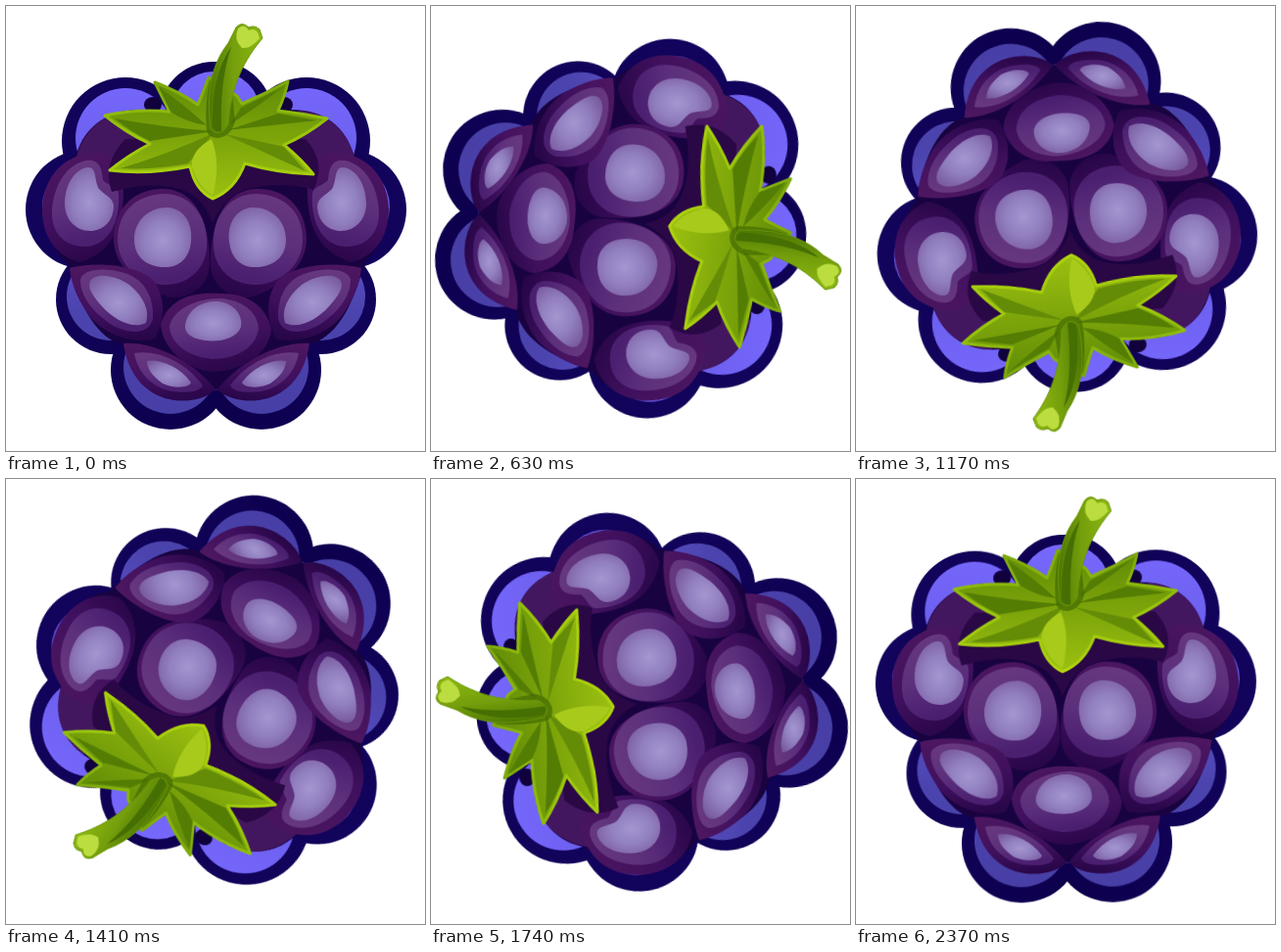
Animation of 428 by 455 pixels, one loop 2400 ms. Source, as an HTML page:

```html
<!DOCTYPE html>
<html lang="en">
<head>
<meta charset="utf-8">
<title>Spinning blackberry</title>
<style>
  html, body { margin: 0; width: 100%; height: 100%; overflow: hidden; background: #fff; }
  svg { display: block; width: 100%; height: 100%; }
  #berry { transform-origin: 214.5px 226px; }
</style>
</head>
<body>
<svg viewBox="0 0 428 455">
  <defs>
    <linearGradient id="navy" gradientUnits="userSpaceOnUse" x1="20" y1="200" x2="408" y2="300">
      <stop stop-color="#12045c"/><stop offset=".5" stop-color="#0e0050"/><stop offset="1" stop-color="#09003c"/>
    </linearGradient>
    <linearGradient id="rim" gradientUnits="userSpaceOnUse" x1="214" y1="70" x2="214" y2="414">
      <stop stop-color="#7668fc"/><stop offset=".3" stop-color="#6a5cea"/><stop offset=".7" stop-color="#4c44ae"/><stop offset="1" stop-color="#473fa6"/>
    </linearGradient>
    <linearGradient id="skin" x1=".3" x2=".6" y2="1">
      <stop stop-color="#4c1660"/><stop offset=".55" stop-color="#40105e"/><stop offset="1" stop-color="#290649"/>
    </linearGradient>
    <linearGradient id="glow" x2=".2" y2="1">
      <stop stop-color="#68397f"/><stop offset=".6" stop-color="#5c2f7c"/><stop offset="1" stop-color="#4b1f70"/>
    </linearGradient>
    <radialGradient id="core" cx=".5" cy=".55" r=".65">
      <stop stop-color="#a496d0"/><stop offset=".5" stop-color="#917fbf"/><stop offset="1" stop-color="#785a9f"/>
    </radialGradient>
    <linearGradient id="leaf" x2="0" y2="1">
      <stop stop-color="#5f8a06"/><stop offset=".5" stop-color="#7da50a"/><stop offset="1" stop-color="#9cc010"/>
    </linearGradient>
    <linearGradient id="edge" x2="0" y2="1">
      <stop stop-color="#7aa60c"/><stop offset=".5" stop-color="#9cc80c"/><stop offset="1" stop-color="#b0d40e"/>
    </linearGradient>
    <linearGradient id="stem" x2="1">
      <stop stop-color="#4d7803"/><stop offset=".45" stop-color="#759f0b"/><stop offset="1" stop-color="#8cb812"/>
    </linearGradient>
  </defs>
  <g id="berry">
    <g id="outer" fill="url(#navy)"></g>
    <g id="inner" fill="url(#rim)"></g>
    <g fill="#10003c">
      <ellipse cx="150" cy="101" rx="9" ry="8"/>
      <ellipse cx="284" cy="101" rx="9" ry="8"/>
    </g>
    <path fill="#180340" d="M72 152C80 124 102 106 140 106H290C326 106 347 124 355 152C400 180 400 232 366 262C354 310 336 340 309 346C300 375 262 402 214 392C166 402 128 375 119 346C94 340 76 310 64 264C30 232 30 180 72 152Z"/>
    <path fill="#43175f" d="M72 154C80 126 102 107 128 107L160 150L108 170ZM356 154C348 126 326 107 300 107L268 150L320 170Z"/>
    <g id="seeds"></g>
    <path fill="#2a0745" d="M122 136Q98 160 108 190Q150 178 180 188Q202 196 211 222Q222 196 244 188Q282 178 314 188Q328 160 306 136Z"/>
    <path fill="url(#leaf)" stroke="url(#edge)" stroke-width="3" stroke-linejoin="round" d="M101 112Q134 105 167 108Q160 94 152 78Q176 87 196 101Q202 87 207 73L236 92L241 100Q264 90 288 77Q285 92 278 107Q304 110 328 115Q308 131 284 142Q302 157 314 172Q278 171 244 161Q234 188 211 197Q193 188 188 164Q145 173 106 168Q124 153 147 141Q122 129 101 112Z"/>
    <g fill="#547d04">
      <path d="M111 115Q160 124 213 128L147 138Q126 128 111 115Z"/>
      <path d="M156 83Q181 100 205 122Q184 119 168 108Z"/>
      <path d="M283 83Q254 105 229 121L240 104Z"/>
      <path d="M318 117Q270 122 226 127L278 110Z"/>
    </g>
    <path fill="#648c07" d="M306 169Q265 150 223 131Q258 138 284 144ZM117 166Q164 152 212 130L186 161Q150 168 117 166Z"/>
    <path fill="#a8ca1a" d="M210 136Q188 148 190 165Q196 184 211 194Q220 162 210 136Z"/>
    <path fill="#3e6602" d="M205 128C202 98 207 66 226 42L234 118Q230 133 217 135Q207 135 205 128Z" opacity=".65"/>
    <path fill="url(#stem)" stroke="#699507" stroke-width="1" d="M209 126C205 92 208 62 227 38L235 22Q241 15 248 22Q254 19 259 24L262 33C244 54 230 80 227 121Q219 135 209 126Z"/>
    <path fill="#456f02" d="M211 124C211 92 214 65 230 42C221 69 219 96 220 128Q214 130 211 124Z"/>
    <path fill="#bcdd3f" d="M237 23Q243 17 248 25Q254 22 257 27L259 33Q250 44 241 43Q232 34 237 23Z"/>
  </g>
</svg>
<script>
  const $ = id => document.getElementById(id);
  const flip = (art, sum) => art + `<g transform="matrix(-1 0 0 1 ${sum} 0)">${art}</g>`;

  // Left-hand lobes: [x, y, outer radius, inner radius].
  const lobes = [
    [212, 113, 56, 43],
    [122, 138, 65, 51],
    [81, 208, 61, 44],
    [107, 300, 56, 45],
    [168, 372, 61, 48]
  ];
  const silhouette = (ring, lift) => {
    const spine = [...lobes.map(([x, y]) => [x, y - lift]), [216, 396 - lift], [216, 113 - lift]];
    return flip(`<path d="M${spine.join('L')}Z"/>` +
      lobes.map(l => `<circle cx="${l[0]}" cy="${l[1] - lift}" r="${l[ring]}"/>`).join(''), 429);
  };
  $('outer').innerHTML = silhouette(2, 0);
  $('inner').innerHTML = silhouette(3, 3);

  // Each drupelet: mirror sum (0 = single), skin, glow, core.
  const seeds = [
    [428,
      'M37 208C38 180 53 156 85 150C107 147 122 160 120 190C120 222 110 252 75 262C50 255 37 235 37 208Z',
      'M47 212C47 188 60 162 82 158C95 156 98 166 99 178C104 184 114 184 115 192C117 222 104 246 80 246C60 246 47 232 47 212Z',
      'M60 202C60 182 71 166 84 165C93 165 90 179 95 187C100 193 109 195 110 204C110 221 98 230 86 230C71 230 60 218 60 202Z'],
    [417,
      'M110 238C111 204 133 187 160 187C190 187 208 215 208 262C209 285 188 302 164 297C135 286 110 266 110 238Z',
      'M114 239C114 208 136 192 163 192C191 193 207 218 205 247C203 271 184 286 160 285C135 283 114 264 114 239Z',
      'M131 239C131 219 146 206 165 206C182 207 191 222 189 241C187 259 176 268 160 267C143 266 131 256 131 239Z'],
    [428,
      'M65 268C85 262 130 262 150 280C162 296 164 318 152 340C130 346 98 336 83 314C73 299 67 286 65 268Z',
      'M76 280C78 269 100 266 124 274C142 281 151 298 150 320C146 335 128 337 108 326C90 314 76 298 76 280Z',
      'M86 281C92 272 112 275 126 285C141 297 147 312 143 324C130 331 110 321 98 307C88 296 83 288 86 281Z'],
    [430,
      'M120 345C150 343 190 362 214 392C202 404 180 406 162 401C138 393 124 373 120 345Z',
      'M131 355C152 351 182 362 201 388C198 396 174 397 159 391C144 384 134 372 131 355Z',
      'M144 363C154 360 178 368 189 385C187 391 170 391 160 386C150 379 144 371 144 363Z'],
    [0,
      'M158 326C165 300 190 292 217 294C245 293 265 305 271 330C270 350 250 372 212 374C185 373 160 350 158 326Z',
      'M167 328C170 310 195 299 218 299C240 300 257 312 258 330C255 350 235 361 210 361C185 358 168 345 167 328Z',
      'M183 326C186 308 203 301 217 302C233 304 242 316 240 328C236 340 218 344 203 342C190 340 182 335 183 326Z']
  ];
  const fills = ['skin', 'glow', 'core'];
  $('seeds').innerHTML = seeds.map(([sum, ...layers]) => {
    const art = layers.map((d, i) => `<path d="${d}" fill="url(#${fills[i]})"/>`).join('');
    return sum ? flip(art, sum) : art;
  }).join('');

  // One clockwise turn in 30 ms steps: [ms, degrees].
  const loop = 2400, tick = 30;
  const turn = [[0, 0], [630, 95], [930, 139.5], [1410, 212.3], [1740, 263.1], [2070, 313.8], [2370, 359.6], [loop, 360]];
  $('berry').animate(turn.map(([ms, deg], i) => ({
    offset: ms / loop,
    transform: `rotate(${deg}deg)`,
    easing: i < turn.length - 1 ? `steps(${(turn[i + 1][0] - ms) / tick}, end)` : 'linear'
  })), { duration: loop, iterations: Infinity });
</script>
</body>
</html>
```
